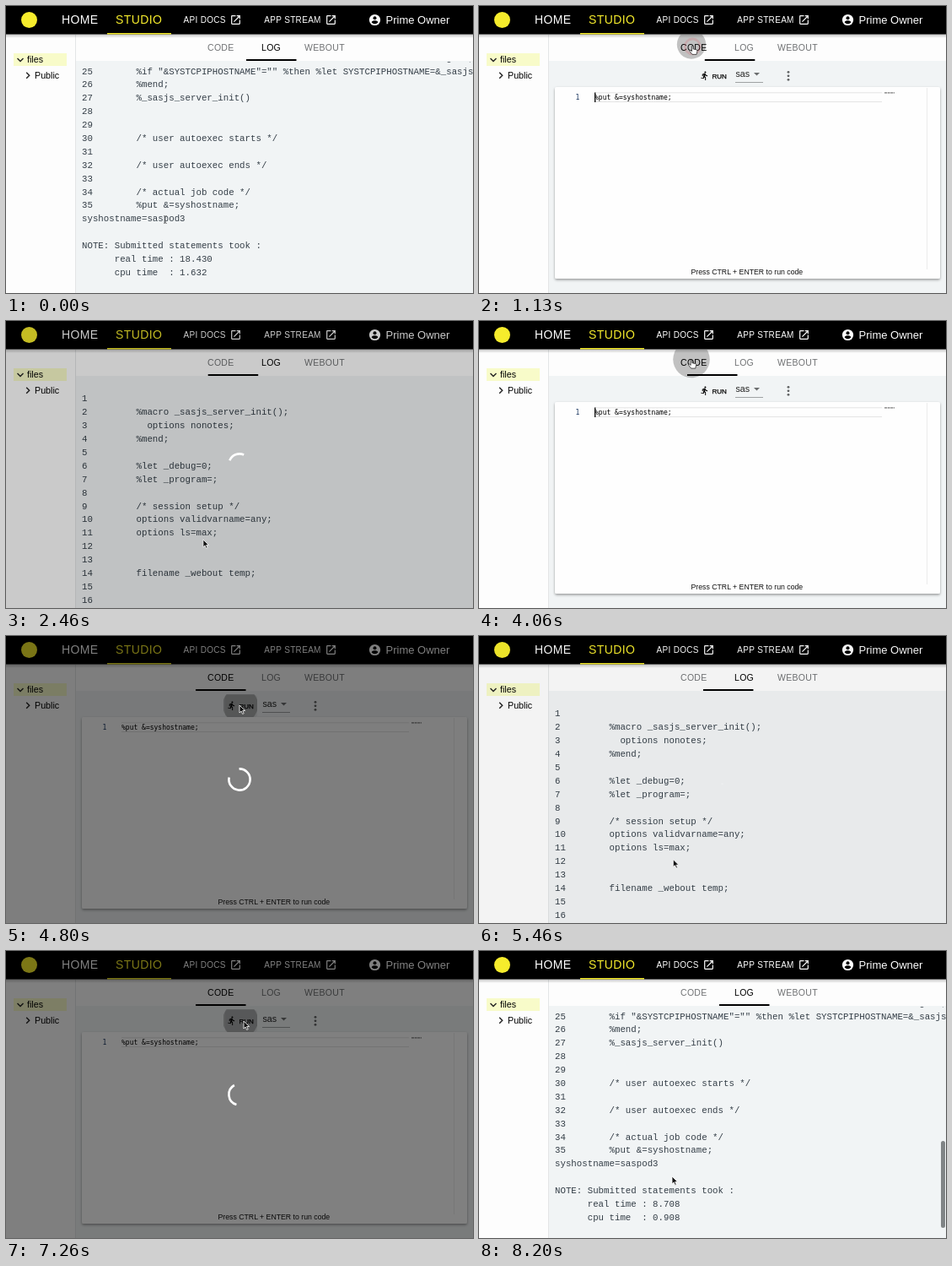
Write an HTML page that moves like this. It is 554 px wide and 340 px high and loops after 8.26 s.

```html
<!DOCTYPE html>
<html lang="en">
<head>
<meta charset="utf-8">
<title>Studio run loop</title>
<style>
html, body { margin: 0; width: 100%; height: 100%; overflow: hidden; background: #fff; }
svg { display: block; width: 100vw; height: 100vh; }
text { font-family: "Liberation Sans", Arial, sans-serif; white-space: pre; }
.log { font: 10.75px "Liberation Mono", Courier, monospace; fill: #343e47; }
.mono { font: 8px "DejaVu Sans Mono", monospace; }
.nav { font-size: 14px; letter-spacing: .4px; fill: #fff; }
.link { font-size: 10px; letter-spacing: .32px; fill: #fff; }
.tab { font-size: 10.5px; letter-spacing: .3px; }
.tree { font-size: 10.7px; }
</style>
</head>
<body>
<svg viewBox="0 0 554 340" xmlns="http://www.w3.org/2000/svg">
  <defs>
    <clipPath id="logClip"><rect x="83" y="66" width="471" height="274"/></clipPath>
    <clipPath id="tabClip"><rect y="34" width="554" height="306"/></clipPath>
    <clipPath id="runClip"><rect x="258" y="69" width="40" height="28" rx="4"/></clipPath>
    <filter id="shadow" x="-5%" y="-5%" width="110%" height="115%">
      <feDropShadow dx="0" dy="1.5" stdDeviation="1.8" flood-color="#000" flood-opacity=".38"/>
    </filter>
    <linearGradient id="headerShade" x2="0" y2="1">
      <stop stop-opacity=".25"/><stop offset="1" stop-opacity="0"/>
    </linearGradient>
    <path id="open" fill="#fff" d="M19 19H5V5h7V3H5c-1.1 0-2 .9-2 2v14c0 1.1.9 2 2 2h14c1.1 0 2-.9 2-2v-7h-2v7zM14 3v2h3.6l-9.8 9.8 1.4 1.4L19 6.4V10h2V3h-7z"/>
  </defs>

  <rect width="554" height="340" fill="#fdfdfd"/>
  <rect x="83" y="65" width="471" height="275" fill="#f1f4f5"/>
  <path d="M82.5 34V340" stroke="#e3e5e6"/>

  <g id="logView" clip-path="url(#logClip)">
    <g id="logLines"></g>
    <rect id="thumb" x="548" width="5" height="103" rx="2.5" fill="#808486"/>
  </g>

  <g id="codeView">
    <rect id="hover" x="260" y="70" width="38" height="26" rx="3" fill-opacity=".06"/>
    <g clip-path="url(#runClip)"><circle id="runRipple"/></g>
    <path transform="translate(261.8 76.8) scale(.49)" d="M13.5 5.5c1.1 0 2-.9 2-2s-.9-2-2-2-2 .9-2 2 .9 2 2 2zm-3.6 13.9l1-4.4 2.1 2v6h2v-7.5l-2.1-2 .6-3c1.3 1.5 3.3 2.5 5.5 2.5v-2c-1.9 0-3.5-1-4.3-2.4l-1-1.6c-.4-.6-1-1-1.7-1-.3 0-.5.1-.8.1l-5.2 2.2v4.7h2v-3.4l1.8-.7-1.6 8.1-4.9-1-.4 2 7 1.4z"/>
    <text x="276.5" y="86" font-size="8" stroke="#000" stroke-width=".25">RUN</text>
    <text x="304.5" y="84" class="tree" fill="#222">sas</text>
    <path d="M304 90.5H337" stroke="#8b8d8e" stroke-width=".8"/>
    <path d="M326 79h7l-3.5 3.6z" fill="#6b6d6e"/>
    <g fill="#606263"><circle cx="367" cy="78.3" r="1.4"/><circle cx="367" cy="82.8" r="1.4"/><circle cx="367" cy="87.3" r="1.4"/></g>
    <rect x="90" y="96" width="457" height="227" rx="2" fill="#fefefe" filter="url(#shadow)"/>
    <path d="M137 102.8H478M137 113.5H478" stroke="#e4e4e4"/>
    <path d="M531.5 97V312" stroke="#ececec"/>
    <path d="M481 102.8H493" stroke="#777" stroke-width="1.2" stroke-dasharray="3 .6"/>
    <text x="114.5" y="111.3" class="mono" fill="#16325c">1</text>
    <text x="137" y="111.3" class="mono">%put &amp;=syshostname;</text>
    <path id="caret" d="M137.7 102.5V114" stroke="#000" stroke-width="1.3"/>
    <text x="251.5" y="318" font-size="8.72" fill="#111">Press CTRL + ENTER to run code</text>
  </g>

  <g id="tabs"></g>
  <rect id="indicator" y="63" width="59.5" height="2"/>
  <circle id="tabRipple" cx="252" cy="45.5" clip-path="url(#tabClip)"/>

  <rect x="9" y="56" width="63" height="15" fill="#f8fbc9"/>
  <g fill="none" stroke="#222" stroke-width="1.4"><path d="M13.5 62l3.5 3.5 3.5-3.5M24.2 78.7l3.5 3.5-3.5 3.5"/></g>
  <text x="25" y="67.4" class="tree">files</text>
  <text x="34" y="86" class="tree">Public</text>

  <rect y="33" width="554" height="5" fill="url(#headerShade)"/>
  <rect width="554" height="33.5"/>
  <circle cx="27.5" cy="16.5" r="9.5" fill="#f6ec2c"/>
  <text x="66" y="21.3" class="nav">HOME</text>
  <text x="130" y="21.3" class="nav" style="fill:#f6ec2c">STUDIO</text>
  <rect x="120" y="32" width="76" height="1.5" fill="#f6ec2c"/>
  <text x="210.5" y="20" class="link">API DOCS</text>
  <text x="306.3" y="20" class="link">APP STREAM</text>
  <use href="#open" transform="translate(265.3 9.3) scale(.6)"/>
  <use href="#open" transform="translate(378.3 9.3) scale(.6)"/>
  <circle cx="437.5" cy="16.5" r="6.6" fill="#fff"/>
  <circle cx="437.5" cy="14.2" r="2"/><path d="M433.6 19.2c1-2.6 6.8-2.6 7.8 0a4.8 4.8 0 0 1-7.8 0z"/>
  <text x="450.5" y="21" font-size="13" fill="#fff">Prime Owner</text>

  <rect id="dim" width="554" height="340"/>
  <path id="spinner" fill="none" stroke="#fff" stroke-width="2.6"/>
  <g id="tooltip">
    <rect x="218" y="105" width="118" height="16" rx="2.5" fill="#707070"/>
    <text x="223" y="115.7" font-size="7.43" fill="#e2e2e2">CTRL+ENTER will also run code</text>
  </g>
  <circle id="ring" fill="#fff" fill-opacity=".15" stroke="#dc4c5a" stroke-width="2.8"/>
  <g id="pointer" stroke-linejoin="round">
    <path id="arrow" d="M0 0V9l2.1-2 1.5 3.4 1.6-.7L3.7 6.5h2.9z" fill="#111" stroke="#fff" stroke-width=".8"/>
    <path id="hand" transform="scale(.92)" d="M-.9 .8C-.9-.4 .9-.4 .9 .8V4l4.2 1c1 .3 1.1 1 .9 2L5.2 11H-.4L-3.5 7c-.7-1.2 .5-1.9 1.4-1.1L-.9 7z" fill="#fff" stroke="#222" stroke-width=".8"/>
    <path id="beam" d="M-1.8-4.5Q0-4.5 0-3.5Q0-4.5 1.8-4.5M0-3.5V3.5M-1.8 4.5Q0 4.5 0 3.5Q0 4.5 1.8 4.5" fill="none" stroke="#555" stroke-width=".8"/>
  </g>
</svg>
<script>
const LOOP = 8260, ROW = 15.88, SCROLL = 396, SPIN = 1400;
const $ = id => document.getElementById(id);
const set = (el, attrs) => { for (const k in attrs) el.setAttribute(k, attrs[k]); };
const show = (el, on) => { el.style.display = on ? '' : 'none'; };
const clamp = v => Math.max(0, Math.min(1, v));
const span = (t, from, length) => clamp((t - from) / length);

function bezier(x1, y1, x2, y2) {
  const at = (a, b, u) => 3 * a * u * (1 - u) ** 2 + 3 * b * u * u * (1 - u) + u ** 3;
  return x => {
    if (x <= 0 || x >= 1) return clamp(x);
    let lo = 0, hi = 1;
    for (let i = 0; i < 20; i++) {
      const mid = (lo + hi) / 2;
      if (at(x1, x2, mid) < x) lo = mid; else hi = mid;
    }
    return at(y1, y2, lo);
  };
}
const standard = bezier(.4, 0, .2, 1);
const easeInOut = bezier(.42, 0, .58, 1);

// code: click on CODE, run: click on RUN, done: log arrives, spin: spinner phase offset
const runs = [
  { code: 1050, run: 1730, done: 2385, scroll: 2700, spin: 83, host: 'saspod2', real: '17.905', cpu: '1.611' },
  { code: 3938, run: 4570, done: 5330, scroll: 5600, spin: 212, host: 'saspod1', real: '19.722', cpu: '1.585' },
  { code: 6540, run: 7040, done: 7800, scroll: 7940, spin: 76, host: 'saspod3', real: '8.708', cpu: '0.908' }
];
const firstLog = { done: -2000, scroll: -1500, host: 'saspod3', real: '18.430', cpu: '1.632' };

// pointer path: time, x, y
const path = [
  [0, 189, 253], [350, 194, 240], [840, 252, 46], [1080, 252, 46], [1450, 286, 79], [1700, 290, 77],
  [1850, 290, 77], [2550, 232, 265], [3250, 230, 267], [3780, 252, 46], [4080, 252, 46],
  [4430, 277, 82], [4850, 277, 82], [5500, 230, 266], [6050, 230, 267], [6400, 260.5, 51.5],
  [6580, 260.5, 51.5], [6930, 282, 83], [7300, 282, 83], [7800, 229, 267], [LOOP, 229, 267]
];

const source = {
  2: '%macro _sasjs_server_init();', 3: '  options nonotes;', 4: '%mend;',
  6: '%let _debug=0;', 7: '%let _program=;', 9: '/* session setup */',
  10: 'options validvarname=any;', 11: 'options ls=max;', 14: 'filename _webout temp;',
  17: '%macro _sasjs_server_init();', 18: '  %let _sasjs_init=1;', 21: '/* host name */',
  24: '* the host name is set here when the session has none: log it;',
  25: '%if "&SYSTCPIPHOSTNAME"="" %then %let SYSTCPIPHOSTNAME=&_sasjs_host;',
  26: '%mend;', 27: '%_sasjs_server_init()', 30: '/* user autoexec starts */',
  32: '/* user autoexec ends */', 34: '/* actual job code */', 35: '%put &=syshostname;'
};

function addText(parent, attrs, content) {
  const el = document.createElementNS('http://www.w3.org/2000/svg', 'text');
  set(el, attrs);
  el.textContent = content;
  return parent.appendChild(el);
}
const logRow = (n, content) => addText($('logLines'), { x: 90, y: 80.6 + (n - 25) * ROW, class: 'log' }, content);
for (let n = 1; n <= 35; n++) logRow(n, String(n).padEnd(10) + (source[n] || ''));
const hostRow = logRow(36, '');
logRow(38, 'NOTE: Submitted statements took :');
const realRow = logRow(39, ''), cpuRow = logRow(40, '');
const tabs = [[239, 'CODE'], [303, 'LOG'], [354, 'WEBOUT']]
  .map(([x, label]) => addText($('tabs'), { x, y: 52.8, class: 'tab' }, label));

function pointerAt(t) {
  const i = Math.max(1, path.findIndex(p => p[0] > t));
  const [a, b] = [path[i - 1], path[i]];
  const k = easeInOut(span(t, a[0], b[0] - a[0]));
  return [a[1] + (b[1] - a[1]) * k, a[2] + (b[2] - a[2]) * k];
}

function dimAt(t) {
  return Math.max(...runs.map(r => t < r.done
    ? standard(span(t, r.run, 225))
    : 1 - standard(span(t, r.done, 195))));
}

function drawSpinner(t, run, alpha) {
  const p = ((t + run.spin) % SPIN) / SPIN;
  const grow = easeInOut(clamp(p * 2)), slide = easeInOut(clamp(p * 2 - 1));
  const unit = 360 / 126.9;
  const offset = (15 * grow + 110 * slide) * unit;
  const end = Math.min(360, offset + (1 + 99 * grow) * unit);
  const point = deg => {
    const a = (deg + p * 360) * Math.PI / 180;
    return `${277 + 12.6 * Math.cos(a)} ${170 + 12.6 * Math.sin(a)}`;
  };
  set($('spinner'), {
    d: `M${point(offset)}A12.6 12.6 0 ${end - offset > 180 ? 1 : 0} 1 ${point(end)}`, opacity: alpha
  });
}

function drawClick(t, x, y) {
  const click = runs.flatMap(r => [r.code, r.run]).find(c => t > c - 130 && t < c + 110);
  show($('ring'), click !== undefined);
  if (click === undefined) return;
  const dt = t - click;
  set($('ring'), { cx: x, cy: y + .7, r: 15.2 - dt * .077, opacity: .72 * (1 - span(dt, 0, 110)) });
}

function drawRipple(el, dt, size, strength) {
  show(el, dt >= 0 && dt < 520);
  set(el, { r: size * (1 - (1 - span(dt, 0, 260)) ** 3), 'fill-opacity': strength * (1 - span(dt, 260, 260)) });
}

function draw(t) {
  const current = runs.findLast(r => t >= r.code);
  const inCode = !!current && t < current.done;
  const log = runs.findLast(r => t >= r.done) || firstLog;
  const dim = dimAt(t);
  const [x, y] = pointerAt(t);

  show($('codeView'), inCode);
  show($('logView'), !inCode);
  tabs.forEach((tab, i) => tab.setAttribute('fill', i === (inCode ? 0 : 1) ? '#000' : '#717375'));
  const moved = current ? standard(span(t, inCode ? current.code : current.done, 300)) : 1;
  set($('indicator'), { x: 225 + 60 * (inCode ? 1 - moved : moved) });

  const scrolled = easeInOut(span(t, log.scroll, 230));
  set($('logLines'), { transform: `translate(0 ${SCROLL * (1 - scrolled)})` });
  set($('thumb'), { y: 68 + 157 * scrolled, opacity: span(t, log.scroll - 20, 60) * (1 - span(t, log.scroll + 500, 200)) });
  hostRow.textContent = 'syshostname=' + log.host;
  realRow.textContent = '      real time : ' + log.real;
  cpuRow.textContent = '      cpu time  : ' + log.cpu;

  const overRun = x > 258 && x < 299 && y > 69 && y < 97;
  show($('hover'), overRun);
  show($('caret'), inCode && t > current.code + 80 && t < current.run - 120);
  drawRipple($('tabRipple'), current ? t - current.code : -1, 25.5, .24);
  set($('runRipple'), { cx: current === runs[0] ? 289 : 278, cy: 82 });
  drawRipple($('runRipple'), inCode ? t - current.run : -1, 21, .24);

  set($('dim'), { opacity: dim * .5 });
  show($('spinner'), dim > 0);
  if (dim > 0) drawSpinner(t, current, Math.min(1, dim * 2.7));
  const tip = span(t, 1610, 100) * (1 - span(t, 1800, 120));
  show($('tooltip'), tip > 0);
  set($('tooltip'), { opacity: tip * .92 });

  drawClick(t, x, y);
  set($('pointer'), { transform: `translate(${x} ${y})` });
  const hand = dim < .45 && (y < 65 || (inCode && overRun));
  const beam = !hand && t < 1000;
  show($('hand'), hand);
  show($('beam'), beam);
  show($('arrow'), !hand && !beam);
}

const start = performance.now();
function tick() {
  draw((performance.now() - start) % LOOP);
  requestAnimationFrame(tick);
}
tick();
</script>
</body>
</html>
```
